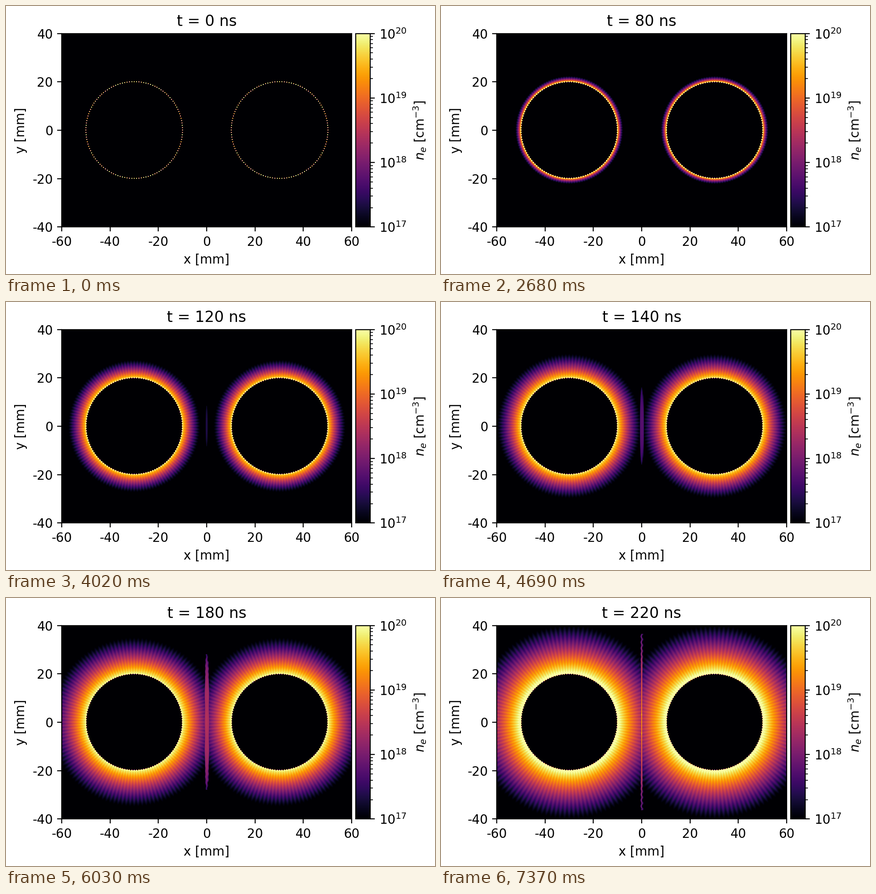
A matplotlib script for the animation above (8 s loop, 947x591 px).

```python
import numpy as np
import matplotlib.pyplot as plt
from matplotlib.animation import FuncAnimation
from matplotlib.colors import LogNorm

W, H, DPI = 947, 591, 200
LOOP, STEPS, DT = 8000, 12, 20      # ms, pictures per loop, ns per picture
WIRES, RADIUS, CENTRE = 128, 20, 30  # wires per array, mm, mm

plt.rcParams.update({"font.family": "DejaVu Sans", "font.size": 10,
                     "axes.unicode_minus": False})

# Pixel centres in mm
NX, NY = 640, 427
x = (np.arange(NX) + 0.5) / NX * 120 - 60
y = (np.arange(NY) + 0.5) / NY * 80 - 40
X, Y = np.meshgrid(x, y)

# Both arrays mirror each other about x = 0
dx = np.abs(X) - CENTRE
R = np.hypot(dx, Y)
theta = np.arctan2(Y, dx)
pitch = 2 * np.pi / WIRES
phase = ((theta / pitch + 0.5) % 1 - 0.5) * pitch
wire_dist = np.hypot(R * np.cos(phase) - RADIUS, R * np.sin(phase))
streak = np.cos(WIRES * theta)

# Collision layer at x = 0 over time
LAYER_T = [100, 120, 140, 160, 180, 200, 220]
LENGTH = [4, 8.5, 16, 22.5, 28, 33, 36.5]
WIDTH = [0.4, 0.45, 0.8, 1.0, 1.0, 1.0, 0.5]
LENS = [0, 0.12, 0.25, 0.38, 0.46, 0.46, 0.4]
CORE = [0, 0, 0, 0.34, 0.54, 0.72, 0.82]


def wires(t):
    """Level of the wire cores, 0..1 over the colour scale."""
    peak = np.interp(t, [0, 20, 40, 60, 80], [1.6, 1.4, 1.15, 1.3, 1.5])
    width = np.interp(t, [0, 20, 40, 60, 80], [0.2, 0.35, 0.56, 0.42, 0.31])
    return peak - (wire_dist / width) ** 2


def outflow(t):
    """Plasma streaming outward from each array."""
    if t < 60:
        return np.zeros_like(R)
    reach = max(0.124 * (t - 61), 1.0)
    u = (R - RADIUS) / (reach * (1 + 0.03 * streak))
    amp = np.interp(t, [60, 80, 120, 160, 220], [0.8, 0.88, 0.9, 0.95, 1.04])
    power = np.interp(t, [60, 120, 220], [1.5, 1.25, 1.15])
    level = amp * np.clip(1 - u, 0, 1.02) ** power
    level += 0.022 * streak * np.clip(level * 8, 0, 1)
    return np.where(R >= RADIUS - 0.05, level, 0)


def layer(t):
    """Thin sheet where the two flows collide."""
    if t < 120:
        return np.zeros_like(R)
    length, width, lens, core = (np.interp(t, LAYER_T, p)
                                 for p in (LENGTH, WIDTH, LENS, CORE))
    s = np.abs(Y) / length
    q = np.sqrt(np.clip(1 - s ** 2, 0, 1))
    late = np.clip((t - 160) / 40, 0, 1)
    wob = late * np.clip(s - 0.55, 0, 1) * 0.45 * np.sin(2.6 * Y + 0.8)
    half = width * q * (1 + 0.2 * late * np.cos(0.5 * (np.abs(Y) - 12))) + 0.05
    edge = np.clip(1.6 * (1 - ((X - wob) / half) ** 2), 0, 1)
    sheet = lens * q ** 0.6 * edge
    knots = sum(np.exp(-((Y - k) / 0.45) ** 2) for k in (3.1, -4.8))
    along = core * (1 - 0.62 * s ** 1.4) + 0.1 * (t >= 200) * knots
    line = along * np.exp(-((X - wob) / 0.3) ** 2) * (s < 1)
    return np.maximum(sheet, line)


def density(t):
    level = np.maximum.reduce([wires(t), outflow(t), layer(t)])
    return 10 ** (17 + 3 * np.clip(level, 0, 1))


def box(left, top, width, height):
    return [left / W, 1 - (top + height) / H, width / W, height / H]


fig = plt.figure(figsize=((W + 1e-6) / DPI, (H + 1e-6) / DPI), dpi=DPI,
                 facecolor="white")
ax = fig.add_axes(box(123, 60.67, 640, 426.67))
cax = fig.add_axes(box(772.4, 60.67, 32, 426.67))

im = ax.imshow(density(0), origin="lower", extent=(-60, 60, -40, 40),
               aspect="auto", interpolation="nearest", cmap="inferno",
               norm=LogNorm(1e17, 1e20))
ax.set_xticks(range(-60, 61, 20))
ax.set_yticks(range(-40, 41, 20))
ax.set_xlabel("x [mm]")
ax.set_ylabel("y [mm]")
title = ax.set_title("t = 0 ns")
fig.colorbar(im, cax=cax, label="$n_e$ [cm$^{-3}$]")


def update(i):
    t = i * DT
    im.set_data(density(t))
    title.set_text(f"t = {t} ns")
    return im, title


anim = FuncAnimation(fig, update, frames=STEPS, interval=LOOP / STEPS,
                     repeat=True, repeat_delay=0, blit=False)
plt.show()
```
